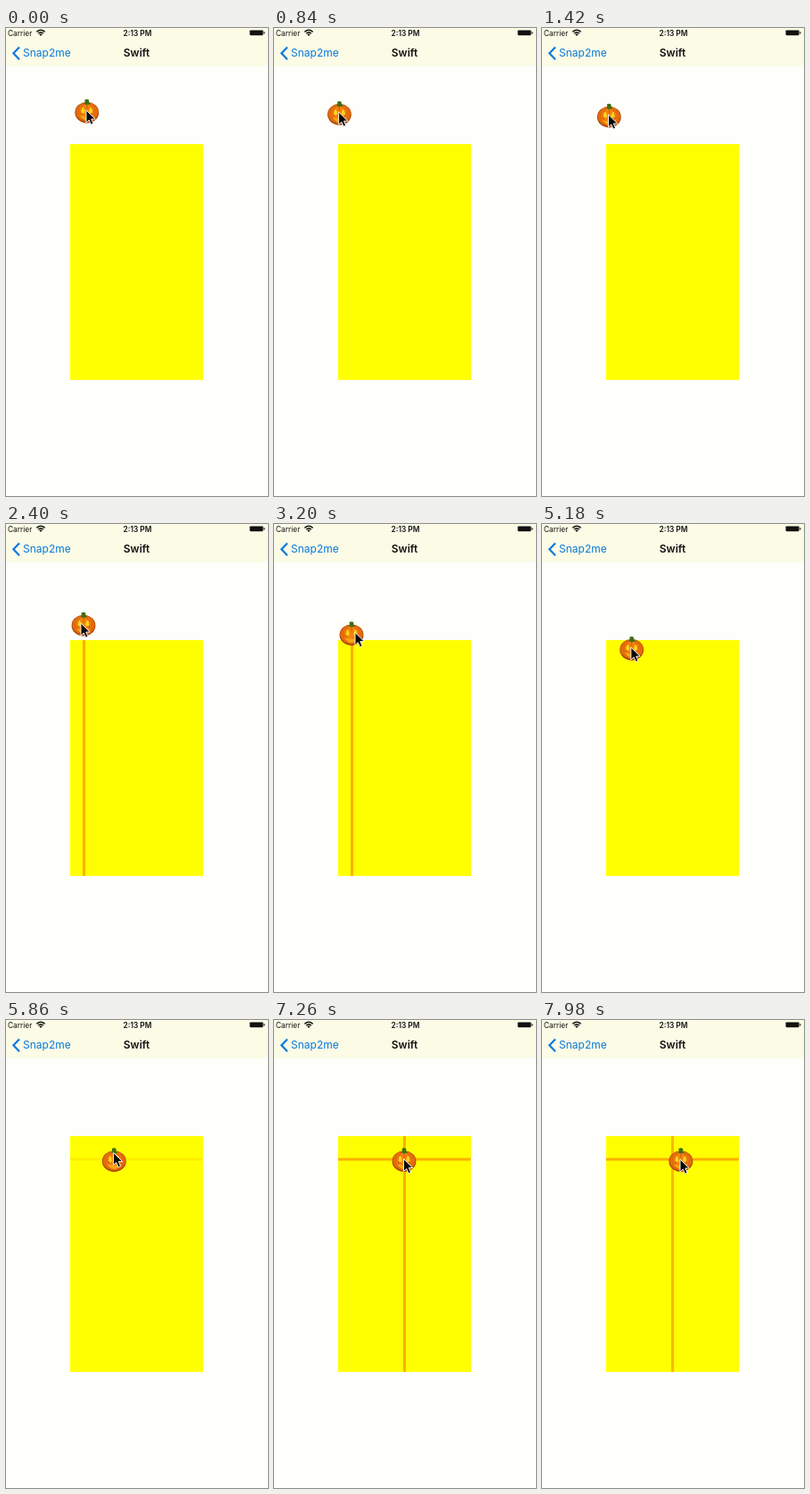
Animation of 294x524 px, one loop 8000 ms. Source, as an HTML page:

```html
<!DOCTYPE html>
<html lang="en">
<head>
<meta charset="utf-8">
<title>Snapping drag</title>
<style>
  html, body { margin: 0; width: 100%; height: 100%; overflow: hidden; background: #fefefa; }
  svg { display: block; width: 100%; height: 100%; font-family: Inter, Roboto, sans-serif; }
</style>
</head>
<body>
<svg viewBox="0 0 294 524">
  <rect width="294" height="524" fill="#fefefa"/>
  <rect width="294" height="43" fill="#fbfbe6"/>

  <g font-size="8.4" fill="#111">
    <text x="2" y="8.6">Carrier</text>
    <text x="147.5" y="8.6" text-anchor="middle" font-weight="600">2:13 PM</text>
    <g fill="none" stroke="#111" stroke-width="1.5">
      <path d="M34.4 4.4Q39 .2 43.6 4.4M36.2 6.3Q39 3.8 41.8 6.3"/>
    </g>
    <path d="M39 8.9L37.3 7.2Q39 5.8 40.7 7.2Z"/>
    <rect x="273.5" y="2.4" width="15" height="5.8" rx="1.2"/>
    <rect x="289.2" y="4.2" width="1.2" height="2.2" rx=".5"/>
  </g>

  <path d="M15 21.5L8.4 28.3L15 35.2" fill="none" stroke="#0878dc" stroke-width="2.2"/>
  <text x="19" y="32.3" font-size="12" fill="#0878dc">Snap2me</text>
  <text x="146.5" y="32.3" font-size="12" font-weight="600" fill="#111" text-anchor="middle">Swift</text>

  <rect x="72" y="130" width="149" height="264" fill="#ff0"/>
  <g stroke="#fab000" stroke-width="3">
    <path id="leftGuide" d="M87.5 130V394"/>
    <path id="centerGuide" d="M146.5 130V394"/>
    <path id="rowGuide" d="M72 156H221"/>
  </g>

  <g id="pumpkin">
    <ellipse cy="1.2" rx="13.4" ry="11.8" fill="#a84306"/>
    <ellipse cy=".6" rx="12.6" ry="10.8" fill="#e46a0c"/>
    <ellipse cy=".2" rx="8.2" ry="10.4" fill="#f2820f"/>
    <g fill="none" stroke="#c8560a" stroke-width=".9">
      <path d="M-3-9.5Q-10 0-4 11M3-9.5Q10 0 4 11M0-9V-3"/>
    </g>
    <path d="M-3-8.5Q-1.5-10-2.5-13Q0-14.5 2.2-13Q1.8-10 4-8.5Q0-6.8-3-8.5Z" fill="#3f6f14"/>
    <path d="M-6.6 1Q-6.2-4.5-4.3-5Q-2-2-2.3 1.2Q-4.5 2.5-6.6 1ZM6.6 1Q6.2-4.5 4.3-5Q2-2 2.3 1.2Q4.5 2.5 6.6 1Z" fill="#ffd21c"/>
    <path d="M-8 4.2Q0 7.5 8 4.2Q5.5 9.5 0 9.6Q-5.5 9.5-8 4.2Z" fill="#f9a712"/>
  </g>
  <path id="cursor" d="M0 0V14L3.2 11L5.5 16.2L8 15L5.8 10H10.2Z" fill="#080808" stroke="#fff" stroke-width=".9"/>
</svg>
<script>
const LOOP = 8000;
const FADE = 180;
const $ = id => document.getElementById(id);

// Pointer tip: time, x, y
const path = [
  [0, 90, 92], [500, 79, 92.5], [1000, 71, 95], [1420, 74.5, 97], [1900, 77, 103],
  [2400, 84, 111], [3200, 91, 121.5], [3900, 91.3, 127], [4500, 92, 130.5],
  [5100, 98, 137], [5860, 120.5, 148.5], [6500, 136, 154], [7260, 145.5, 155.5], [7980, 155, 156]
];

// Each guide holds the pumpkin while it is active.
const guides = [
  { el: $('leftGuide'), axis: 'x', at: 87, from: 2080, to: 4960 },
  { el: $('centerGuide'), axis: 'x', at: 146, from: 6640, to: 7960 },
  { el: $('rowGuide'), axis: 'y', at: 157, from: 5820, to: LOOP }
];

const clamp = v => Math.max(0, Math.min(1, v));

function slope(i, k) {
  const a = path[Math.max(0, i - 1)], b = path[Math.min(path.length - 1, i + 1)];
  return (b[k] - a[k]) / (b[0] - a[0]);
}

function pointerAt(t) {
  const last = path.length - 1;
  t = Math.min(t, path[last][0]);
  let i = 0;
  while (i < last - 1 && t > path[i + 1][0]) i++;
  const a = path[i], b = path[i + 1], d = b[0] - a[0], u = (t - a[0]) / d;
  const hermite = k =>
    a[k] + u * u * (3 - 2 * u) * (b[k] - a[k]) +
    d * u * (1 - u) * ((1 - u) * slope(i, k) - u * slope(i + 1, k));
  return { x: hermite(1), y: hermite(2) };
}

function place(el, { x, y }) {
  el.setAttribute('transform', `translate(${x} ${y})`);
}

function draw(t) {
  const tip = pointerAt(t);
  const pumpkin = { x: tip.x + 0.8, y: tip.y + 1.5 };
  for (const g of guides) {
    if (t >= g.from && t < g.to) pumpkin[g.axis] = g.at;
    g.el.style.opacity = clamp((t - g.from) / FADE) * clamp(1 - (t - g.to) / FADE);
  }
  place($('pumpkin'), pumpkin);
  place($('cursor'), tip);
}

const start = performance.now();
function tick() {
  draw((performance.now() - start) % LOOP);
  requestAnimationFrame(tick);
}
tick();
</script>
</body>
</html>
```
